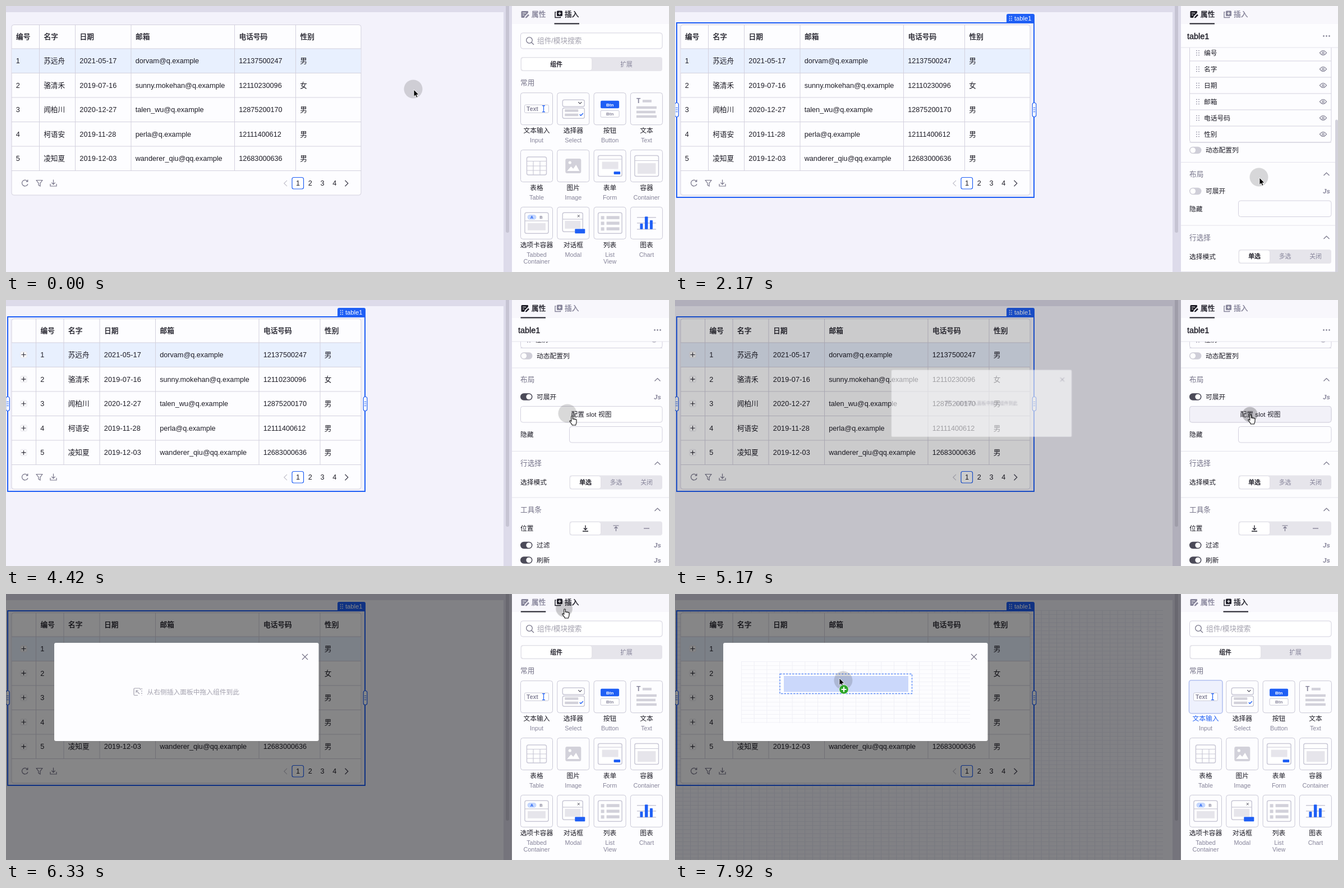
Write an HTML page that moves like this. It is 1182 px wide and 474 px high and loops after 8000 ms.

```html
<!DOCTYPE html>
<html lang="zh-CN">
<head>
<meta charset="utf-8">
<title>table1</title>
<style>
html, body { margin: 0; width: 100%; height: 100%; overflow: hidden; background: #dddbea; }
svg { display: block; width: 1182px; height: 474px; color: #1d1c26;
  font-family: "Liberation Sans", "Noto Sans CJK SC", "Noto Sans CJK", sans-serif; }
text { fill: currentColor; white-space: pre; }
.m { stroke: currentColor; stroke-width: .35px; }
.b { font-weight: 700; }
.g { color: #86849a; }
.h { color: #757389; }
.p { color: #a3a1ae; }
.blue { color: #1f5ff5; }
.w { color: #fff; }
.d { letter-spacing: .15px; }
.mid { text-anchor: middle; }
.js { font-style: italic; font-weight: 700; color: #86849a; }
.code { font-family: "DejaVu Sans Mono", "Noto Sans CJK SC", monospace; }
.code .str { fill: #a8201f; }
.code .num { fill: #24663c; }

/* One percent of every timeline is one step of 1/12 s. */
.a { animation: 100s linear both paused; }
.s { animation: 100s step-end both paused; }
#outline, #handles, #props, #expand, #slot, #toggleOn, #veil, #modal, #grid, #dropGrid,
#drop, #beam, #hand, #plus, #lit, #slotHover { opacity: 0; }

#outline { animation-name: outline; }
@keyframes outline { 3% { opacity: 1 } }
#handles { animation-name: handles; }
@keyframes handles { 9% { opacity: 1 } }
#props { animation-name: props; }
@keyframes props { 10% { opacity: 1 } 76% { opacity: 0 } }
#insert { animation-name: insert; }
@keyframes insert { 10% { opacity: 0 } 76% { opacity: 1 } }
#tabProps { color: #86849a; animation-name: tabProps; }
@keyframes tabProps { 10% { color: #1d1c26 } 76% { color: #86849a } }
#tabInsert { animation-name: tabInsert; }
@keyframes tabInsert { 10% { color: #86849a } 76% { color: #1d1c26 } }
#underline { animation-name: underline; }
@keyframes underline { 0%, 10% { translate: 60px } 12%, 76% { translate: 0px } 77%, 100% { translate: 60px } }

#scroll { animation-name: scroll; }
@keyframes scroll {
  0%, 18% { translate: 0 0 } 20% { translate: 0 -40px } 24% { translate: 0 -240px }
  27%, 28% { translate: 0 -350px } 31% { translate: 0 -438px } 33%, 34% { translate: 0 -452px }
  36%, 100% { translate: 0 -471px }
}
#thumb { animation-name: thumb; }
@keyframes thumb {
  0%, 18% { translate: 0 0 } 20% { translate: 0 16px } 24% { translate: 0 96px }
  27%, 28% { translate: 0 140px } 31% { translate: 0 175px } 33%, 34% { translate: 0 181px }
  36%, 100% { translate: 0 188px }
}
#bar { animation-name: bar; }
@keyframes bar { 37% { opacity: 0 } }

#toggleOn { animation-name: toggleOn; }
@keyframes toggleOn { 49% { opacity: 1 } }
#expand, #slot { animation-name: expand; }
@keyframes expand { 50% { opacity: 1 } }
#cols { animation-name: cols; }
@keyframes cols { 50% { translate: 43.5px } }
#below { animation-name: below; }
@keyframes below { 50% { translate: 0 36px } }
#slotHover { animation-name: slotHover; }
@keyframes slotHover { 54% { opacity: 1 } 70% { opacity: 0 } }

#veil { animation-name: veil; }
@keyframes veil { 0%, 61% { opacity: 0 } 62% { opacity: .2 } 63% { opacity: .42 } 64%, 100% { opacity: .47 } }
#modal { transform-origin: 1027px 205px; animation-name: modal; }
@keyframes modal {
  0%, 61% { scale: .2; opacity: 0 } 62% { scale: .68; opacity: .6 } 63% { scale: .94; opacity: 1 }
  64% { scale: .9925; opacity: 1 } 65%, 100% { scale: 1; opacity: 1 }
}
#lit { animation-name: lit; }
@keyframes lit { 86% { opacity: 1 } }
#litName { animation-name: litName; }
@keyframes litName { 86% { color: #1f5ff5 } }
#grid, #dropGrid { animation-name: grid; }
@keyframes grid { 89% { opacity: 1 } }
#hint { animation-name: hint; }
@keyframes hint { 89% { opacity: 0 } }
#drop { animation-name: drop; }
@keyframes drop {
  92% { opacity: 1; translate: 103px 7.2px } 93% { opacity: 1; translate: 68px 14.4px }
  94% { opacity: 1; translate: 22.7px 14.4px } 95% { opacity: 1; translate: 0 0 }
}

#pointer, #halo { animation-name: move; }
#halo { animation-delay: .4s; }
@keyframes move {
  0%, 1% { translate: 727px 149px } 2% { translate: 716px 153px } 3% { translate: 676px 170px }
  4% { translate: 628px 190px } 5% { translate: 594px 203px } 6%, 10% { translate: 582px 208px }
  11% { translate: 610px 212px } 12% { translate: 690px 222px } 13% { translate: 805px 236px }
  14% { translate: 920px 250px } 15% { translate: 995px 262px } 16% { translate: 1020px 283px }
  17% { translate: 1032px 294px } 19%, 30% { translate: 1042px 306px } 33% { translate: 1047px 315px }
  34% { translate: 1052px 312px } 37% { translate: 1075px 268px } 38% { translate: 1072px 264px }
  41% { translate: 1020px 235px } 44% { translate: 955px 190px } 46%, 50% { translate: 934px 172px }
  51% { translate: 952px 184px } 52% { translate: 991px 197px } 53% { translate: 1009px 207px }
  54% { translate: 1018px 208px } 56%, 68% { translate: 1026px 205px } 70% { translate: 1020px 160px }
  72% { translate: 1005px 80px } 74% { translate: 997px 38px } 75%, 78% { translate: 996px 27px }
  79% { translate: 998px 60px } 81% { translate: 985px 170px } 83% { translate: 965px 290px }
  84% { translate: 958px 300px } 86% { translate: 947px 212px } 87%, 88% { translate: 945px 187px }
  89% { translate: 895px 180px } 90% { translate: 770px 172px } 91% { translate: 620px 162px }
  92% { translate: 470px 158px } 93% { translate: 360px 163px } 94% { translate: 313px 162.5px }
  95%, 100% { translate: 293px 150px }
}
#press { animation-name: press; }
@keyframes press {
  0%, 7% { scale: 1; opacity: .17 } 8% { scale: .8; opacity: .28 } 9%, 47% { scale: 1; opacity: .17 }
  48% { scale: .8; opacity: .28 } 49%, 61% { scale: 1; opacity: .17 } 62%, 64% { scale: .82; opacity: .26 }
  66%, 74% { scale: 1; opacity: .17 } 75%, 76% { scale: .9; opacity: .22 } 78%, 100% { scale: 1; opacity: .17 }
}
#arrow { animation-name: arrow; }
@keyframes arrow {
  15% { opacity: 0 } 18% { opacity: 1 } 45% { opacity: 0 } 69% { opacity: 1 }
  74% { opacity: 0 } 79% { opacity: 1 }
}
#beam { animation-name: beam; }
@keyframes beam { 15% { opacity: 1 } 18% { opacity: 0 } }
#hand { animation-name: hand; }
@keyframes hand { 45% { opacity: 1 } 69% { opacity: 0 } 74% { opacity: 1 } 79% { opacity: 0 } }
#plus { animation-name: plus; }
@keyframes plus { 90% { opacity: 1 } }
</style>
</head>
<body>
<svg id="stage" viewBox="0 0 1182 474"></svg>
<script>
const BLUE = '#1f5ff5', LINE = '#d3d1de', SOFT = '#c9c8d6', BLOCK = '#d2d1da', PALE = '#e6e5eb', ICON = '#77758a';

// y is the middle of the text line
const text = (x, y, s, cls = '', size = 12.66) =>
  `<text x="${x}" y="${y + size * .355}" class="${cls}" font-size="${size}">${s}</text>`;
const rect = (x, y, w, h, fill = 'none', stroke = 'none', r = 0, sw = 1) =>
  `<rect x="${x}" y="${y}" width="${w}" height="${h}" rx="${r}" fill="${fill}" stroke="${stroke}" stroke-width="${sw}"/>`;
const path = (d, stroke = ICON, w = 1.2, fill = 'none') =>
  `<path d="${d}" stroke="${stroke}" stroke-width="${w}" fill="${fill}"/>`;
const circle = (x, y, r, fill, stroke = 'none', w = 1) =>
  `<circle cx="${x}" cy="${y}" r="${r}" fill="${fill}" stroke="${stroke}" stroke-width="${w}"/>`;
const group = (id, cls, ...parts) => `<g id="${id}" class="${cls}">${parts.join('')}</g>`;
const each = (list, f) => list.map(f).join('');
const dots = (x, y, fill, gap = 4) => each([0, 1, 2, 3, 4, 5], i =>
  circle(x + (i % 2 - .5) * gap, y + ((i >> 1) - 1) * gap, .85, fill));

const heads = ['编号', '名字', '日期', '邮箱', '电话号码', '性别'];
const left = [10, 59.5, 123.5, 223, 407.5, 516.5];
const people = [
  ['1', '苏远舟', '2021-05-17', 'dorvam@q.example', '12137500247', '男'],
  ['2', '骆清禾', '2019-07-16', 'sunny.mokehan@q.example', '12110230096', '女'],
  ['3', '闻柏川', '2020-12-27', 'talen_wu@q.example', '12875200170', '男'],
  ['4', '柯语安', '2019-11-28', 'perla@q.example', '12111400612', '男'],
  ['5', '凌知夏', '2019-12-03', 'wanderer_qiu@qq.example', '12683000636', '男']
];
const rowY = i => 97.5 + i * 43.6;

function table() {
  const rules = each([0, 1, 2, 3, 4, 5], i => path(`M10 ${76 + i * 43.5}H633`, LINE, 1));
  const cells = each(people, (p, r) => each(p, (s, c) => text(left[c] + 7.7, rowY(r), s, c == 2 ? 'd' : '')));
  const expanders = each(people, (p, r) =>
    rect(26, rowY(r) - 5.5, 11, 11, '#fdfdff', PALE, 2) + path(`M27.5 ${rowY(r)}h8m-4-4v8`, '#2a2935', 1.1));
  return rect(10, 33.5, 623, 303.5, '#fdfdff', LINE, 4) + rect(10.5, 76, 622, 43.5, '#e8f0fe') + rules +
    group('cols', 's', each(heads, (s, i) => text(left[i] + 8, 55, s, 'm')), cells,
      each(left.slice(1), x => path(`M${x} 34V293.5`, LINE, 1))) +
    group('expand', 's', path('M53.5 34V293.5', LINE, 1), expanders) +
    path('M38.2 312.2A5.4 5.4 0 1 0 39 317.2M38.8 309.5V312.8H35.6') +
    path('M54.2 310.5H64.8L61 315.6V321L58 319.2V315.6Z') +
    path('M84.5 309.5V317.5M81.3 314.6L84.5 317.8L87.7 314.6M79 317V321H90V317') +
    path('M501 310.8L495.8 316L501 321.2', '#c3c2cd') + path('M604.5 310.8L609.7 316L604.5 321.2', '#4a4958', 1.4) +
    rect(510, 305.5, 20.5, 20.5, '#fff', BLUE, 3, 1.2) +
    each([1, 2, 3, 4], n => text(498.6 + n * 21.8, 316, n, 'mid'));
}

const handle = x => rect(x - 3.3, 172.5, 6.6, 25, '#fff', BLUE, 3, 1.2) +
  each([-3.5, 0, 3.5], d => path(`M${x - 1.7} ${185 + d}h3.4`, BLUE, 1));
const selection = () =>
  group('outline', 's', rect(3, 30, 637, 311, 'none', BLUE, 0, 2),
    path('M591 30V17Q591 14 594 14H638Q641 14 641 17V30Z', 'none', 0, BLUE),
    dots(598.3, 22, '#fff', 3.4), text(605, 22, 'table1', 'w', 11.2)) +
  group('handles', 's', handle(3), handle(640.5));

const tabs = () => rect(902, 0, 280, 32, '#f8f7fc') +
  group('tabProps', 's', `<path fill="currentColor" d="M920 9H930Q931 9 931 10V12L925 18L924 21H920Q918.5 21 918.5 19.5V10.5Q918.5 9 920 9ZM926 20L931 14.5L933 16.5L928 21.3H926Z"/>`,
    path('M921 12.5h6m-6 3.5h3', '#fff', 1.1), text(937, 15, '属性', 'm')) +
  group('tabInsert', 's', `<path fill="currentColor" d="M983.5 8.5H990.5Q992 8.5 992 10V16.5Q992 18 990.5 18H983.5Q982 18 982 16.5V10Q982 8.5 983.5 8.5Z"/><path fill="none" stroke="currentColor" stroke-width="1.4" d="M980.5 11H979V20.5H988.5V19"/>`,
    path('M987 10.5v5.4m-2.7-2.7h5.4', '#fff', 1.2), text(996, 15, '插入', 'm')) +
  group('underline', 'a', rect(917.5, 30.5, 44.5, 2, '#1d1c26'));

const segment = (x, y, w, n) => rect(x, y, w, 25, PALE, 'none', 4) + rect(x + 1, y + 1, w / n, 23, '#fff', '#dcdbe4', 4, .8);

const cards = [
  ['文本输入', 'Input'], ['选择器', 'Select'], ['按钮', 'Button'], ['文本', 'Text'],
  ['表格', 'Table'], ['图片', 'Image'], ['表单', 'Form'], ['容器', 'Container'],
  ['选项卡容器', 'Tabbed', 'Container'], ['对话框', 'Modal'], ['列表', 'List', 'View'], ['图表', 'Chart']
];
const frame = (x, y, w, h) => rect(x, y, w, h, '#fff', SOFT, 3, 1.5);
const bars = (list, h = 4.5) => each(list, ([x, y, w]) => rect(x, y, w, h, BLOCK));
// icons are drawn around the middle of a card
const icons = [
  rect(-21.5, -7, 43, 14, '#fff', SOFT, 2) + text(-18, 0, 'Text', 'b g', 10.5) + path('M10 -5.5h5m-2.5 0v11m-2.5 0h5', BLUE, 1.2),
  frame(-19, -16, 39, 12) + path('M9 -12l3 3 3-3', '#4a4958') + frame(-19, -1.5, 39, 18.5) +
    bars([[-15, 1, 24], [-15, 8.5, 24]]) + path('M11.5 10l2 2 4-4', BLUE, 1.5),
  rect(-16.5, -14.5, 33, 13.5, BLUE, 'none', 2) + text(0, -7.5, 'Btn', 'b w mid', 8) +
    rect(-16.5, 3, 33, 12, '#fff', SOFT, 2) + text(0, 9, 'Btn', 'b g mid', 8),
  text(-18, -14, 'T', 'b g', 12) + bars([[-7, -16, 16], [-18, -4.5, 36], [-18, 3.5, 34], [-18, 11.5, 36]]),
  frame(-17.5, -16, 35, 32) + path('M-17 -8.5H17M-17 0H17M-17 8H17M-6 -8.5V16M6 -8.5V16', SOFT),
  rect(-14, -13, 28, 26, BLOCK, 'none', 3) + circle(-6, -6, 2.6, '#fff') + path('M-11 9L-4 1L0 5L5 -2L11 9Z', 'none', 0, '#fff'),
  frame(-21, -18.5, 42.5, 37) + path('M-21 -12H21', SOFT) + rect(-14, -7.5, 29, 13, PALE) + rect(7, 10, 11.5, 5, BLUE, 'none', 1),
  frame(-21, -18.5, 42.5, 37) + path('M-21 -9.5H21', SOFT) + rect(-16, -5, 32.5, 19, PALE),
  frame(-21, -18.5, 42, 37) + rect(-16.5, -15, 16, 9, '#c5d7fd', 'none', 4.5) + text(-8.5, -10.5, 'A', 'b blue mid', 7.5) +
    text(8, -10.5, 'B', 'b g mid', 7.5) + path('M-21 -4H21', SOFT) + rect(-16, 0, 32, 13, PALE),
  frame(-19, -18.5, 36, 34) + path('M7.5 -14.5l4 4m0-4l-4 4', '#4a4958', 1) + path('M-19 -7H17', SOFT) +
    rect(-15, -4, 28, 14, PALE) + rect(3, 10.5, 18, 8, BLUE, 'none', 1),
  frame(-21, -18.5, 42.5, 37) + each([-12.5, -2.5, 7.5], y => rect(-16, y, 6, 6, BLOCK) + rect(-6, y, 23, 5.5, BLOCK)),
  path('M-17 -10H17M-17 0H17M-17 11H17', SOFT, 1.4) + rect(-11.5, 1, 5, 10, BLUE, 'none', 1) +
    rect(-3, -11.5, 5.5, 22.5, BLUE, 'none', 1) + rect(6, -5, 5, 16, BLUE, 'none', 1)
];
const card = ([name, ...sub], i) => {
  const x = 946 + (i % 4) * 65.3, y = 183.2 + (i >> 2) * 101.8;
  const label = text(x, y + 39, name, 'mid', 11.75);
  return rect(x - 28.5, y - 28.5, 57, 57, '#fdfdff', SOFT, 4) +
    (i ? label : group('lit', 's', rect(x - 29.5, y - 29.5, 59.5, 59, '#eef1fd', '#b4c1f0', 4, 1.6)) + group('litName', 's', label)) +
    `<g transform="translate(${x} ${y})">${icons[i]}</g>` +
    each(sub, (s, n) => text(x, y + 56 + n * 12.5, s, 'mid g', 10.85));
};
const insertPanel = () => group('insert', 's',
  rect(917.5, 48, 252.5, 28, '#fff', LINE, 4), circle(933, 61, 5.3, 'none', ICON, 1.3), path('M937 65l4 4', ICON, 1.3),
  text(947, 62, '组件/模块搜索', 'p'), segment(917.5, 91, 252.5, 2),
  text(981, 104, '组件', 'm mid', 10.85), text(1106, 104, '扩展', 'g mid', 10.85),
  text(917, 137, '常用', 'h'), each(cards, card));

const section = (y, name, rule) => (rule ? path(`M902 ${rule}H1182`, '#e3e2eb', 1) : '') +
  text(917, y, name, 'h') + path(`M1156.5 ${y + 2.5}l5-5 5 5`);
const knob = (y, on) => rect(917, y - 6.2, 21.5, 12.5, on ? '#4b4a58' : '#cfced8', 'none', 6.2) + circle(on ? 932.2 : 923.3, y, 4.8, '#fff');
const toggle = (y, name, on, js) => knob(y, on) + text(946, y, name, '', 11.75) + (js ? text(1155, y, 'Js', 'js', 11.5) : '');
const column = (s, i) => {
  const y = 397 + i * 29;
  return dots(932, y, ICON) + text(943, y, s, '', 11.75) + path(`M917.5 ${y + 14.5}h252.5`, LINE, 1) +
    path(`M1149.5 ${y}Q1155.5 ${y - 8} 1161.5 ${y}Q1155.5 ${y + 8} 1149.5 ${y}Z`) + circle(1155.5, y, 1.7, 'none', ICON, 1.1);
};
function code() {
  const keys = ['id', 'name', 'date', 'email', 'phoneNumber', 'gender'];
  const line = (k, i) => {
    const v = people[0][i], end = i < 5 ? ',' : '';
    const value = i ? `<tspan class="str">"${v}"</tspan>` : `<tspan class="num">${v}</tspan>`;
    return text(939, 190 + i * 20, `<tspan class="str">"${k}"</tspan>: ${value}${end}`, 'code', 11.65);
  };
  return rect(917.5, 136, 252.5, 162, '#fff', '#a3a2b3', 4) +
    `<g clip-path="url(#codeClip)">${text(925, 150, '[', 'code', 11.65)}${text(932, 170, '{', 'code', 11.65)}${each(keys, line)}</g>` +
    rect(1160, 141, 5.5, 18, '#d0cfd9', 'none', 2.5) + rect(1149.5, 277.5, 13.5, 13.5, '#fff', SOFT, 3) +
    path('M1153 284v-3h3m3.500 3.500v3h-3m-3-6l6 6', ICON, .9);
}
const choose = y => segment(1004.5, y - 12.5, 165.5, 3);
const propsPanel = () => group('props', 's',
  text(913, 53.5, 'table1', 'm', 14.46), each([1156.5, 1161.5, 1166.5], x => circle(x, 53.5, 1.3, ICON)),
  '<g clip-path="url(#panelClip)">', group('scroll', 'a',
    section(96, '数据'), text(917, 122, '数据', '', 11.75), code(),
    section(335, '列', 313.5), text(917, 365, '列数<tspan fill="#86849a">(6)</tspan>', '', 11.75),
    path('M1136 365h7m-3.500-3.500v7', BLUE, 1.3), text(1146.500, 365, '添加', 'blue', 11.75),
    rect(917.5, 382.5, 252.5, 174, '#fdfdff', LINE, 4), each(heads, column),
    toggle(570.5, '动态配置列', false, false), section(613, '布局', 592),
    toggle(643.5, '可展开', false, true), group('toggleOn', 's', knob(643.5, true)),
    group('slot', 's', rect(917.5, 660.5, 252.5, 28.5, '#fff', LINE, 4),
      group('slotHover', 's', rect(917.5, 660.5, 252.5, 28.5, '#f2f1f8', LINE, 4)),
      text(1043.5, 675, '配置 slot 视图', 'mid', 11.75)),
    group('below', 's',
      text(917, 675, '隐藏', '', 11.75), rect(1004.5, 660.5, 165.5, 28.5, '#fdfdff', LINE, 4),
      section(726, '行选择', 704.5), text(917, 760, '选择模式', '', 11.75), choose(760),
      text(1033, 760, '单选', 'm mid', 10.85), text(1087.5, 760, '多选', 'g mid', 10.85), text(1142, 760, '关闭', 'g mid', 10.85),
      section(808.5, '工具条', 787), text(917, 842, '位置', '', 11.75), choose(842),
      path('M1033 836.5v8m-3-3l3 3 3-3m-8 5.500h10', '#1d1c26', 1.3),
      path('M1087.500 847v-8m-3 3l3-3 3 3m-8-5h10', ICON, 1.2), path('M1137 842h10', ICON, 1.2),
      toggle(872, '过滤', true, true), toggle(898.5, '刷新', true, true), toggle(924, '下载', true, true))),
  '</g>', path('M902 74H1182', '#e3e2eb', 1),
  group('bar', 's', group('thumb', 'a', rect(1177, 77, 5, 275, '#d3d2dc', 'none', 2.5))));

const modal = () => group('modal', 'a',
  rect(86, 87, 471.5, 175, '#fdfdff', 'none', 3), path('M528 107l10 10m0-10l-10 10', ICON, 1.2),
  group('hint', 's', path('M235 180.500H229.500Q228 180.500 228 179V169.500Q228 168 229.500 168H238Q239.500 168 239.500 169.500V171M232 172l6 6m-6-2v-4h4', '#a3a1ae', 1.2),
    path('M242 168v12.500', '#a3a1ae', 1.3).replace('/>', ' stroke-dasharray="2 2"/>'),
    text(251.5, 174.5, '从右侧插入面板中拖入组件到此', 'p', 11.75)),
  group('dropGrid', 's', rect(118, 120, 408, 110, 'url(#wide)')),
  group('drop', 's', rect(187, 142.5, 235.5, 35, '#fff', 'none'),
    rect(187, 142.5, 235.5, 35, 'none', '#5f8df7', 0, 1.4).replace('/>', ' stroke-dasharray="3.500 2"/>'),
    rect(194, 146, 222, 28.5, '#cbd8fb')));

const pointer = () =>
  group('halo', 'a', `<g transform="translate(-1 -1)">${group('press', 'a', circle(0, 0, 16.5, '#222'))}</g>`) +
  group('pointer', 'a',
    group('arrow', 's', path('M0 0V12.500L2.900 9.900L4.900 14.300L7 13.400L5.100 9.100H9Z', '#fff', .9, '#000')),
    group('beam', 's', path('M-3-7Q0-7 0-5Q0-7 3-7M0-5V5M-3 7Q0 7 0 5Q0 7 3 7M-1.500 2h3', '#111', 1.2)),
    group('hand', 's', path('M-1.200 1A1.300 1.300 0 0 1 1.400 1V5.500A1.300 1.300 0 0 1 3.800 5.600A1.200 1.200 0 0 1 6 6.300A1.100 1.100 0 0 1 8 7.200V10.500C8 13 7 14 6.500 16H.5C0 14-2 12-4 9.500C-4.500 8-3 7.500-1.200 9Z', '#111', 1.1, '#fff')),
    group('plus', 's', circle(8, 20, 8.3, '#2ea52b', '#fff', .8), path('M8 15.500v9m-4.500-4.500h9', '#fff', 2.2)));

const tile = (id, x, y, w, h, color) =>
  `<pattern id="${id}" x="${x}" y="${y}" width="${w}" height="${h}" patternUnits="userSpaceOnUse">${path(`M0 .5H${w}M.5 0V${h}`, color, 1)}</pattern>`;
const clip = (id, ...box) => `<clipPath id="${id}">${rect(...box)}</clipPath>`;

stage.innerHTML = `<defs>${tile('fine', 0, 29, 13.6, 7.23, '#e0e2ee')}${tile('wide', 118, 120, 22.67, 7.23, '#f0f0f6')}
  ${clip('panelClip', 902, 74, 280, 400)}${clip('codeClip', 918, 137, 251, 160.5)}</defs>` +
  rect(0, 0, 902, 474, '#dddbea') + rect(0, 11, 887, 463, '#f3f2fb') + rect(891, -4, 6, 408, '#c6c4d3', 'none', 3) +
  group('grid', 's', rect(0, 29, 870, 445, 'url(#fine)')) + table() + selection() +
  group('veil', 'a', rect(0, 0, 902, 474, '#000')) + modal() +
  rect(902, 0, 280, 474, '#fdfdff') + tabs() + insertPanel() + propsPanel() + pointer();

const timelines = document.getAnimations();
let begin;
function tick(now) {
  begin ??= now;
  const step = Math.floor((now - begin + 4) * 12 / 1000) % 96;
  for (const line of timelines) line.currentTime = step * 1000 + 5;
  requestAnimationFrame(tick);
}
requestAnimationFrame(tick);
</script>
</body>
</html>
```
